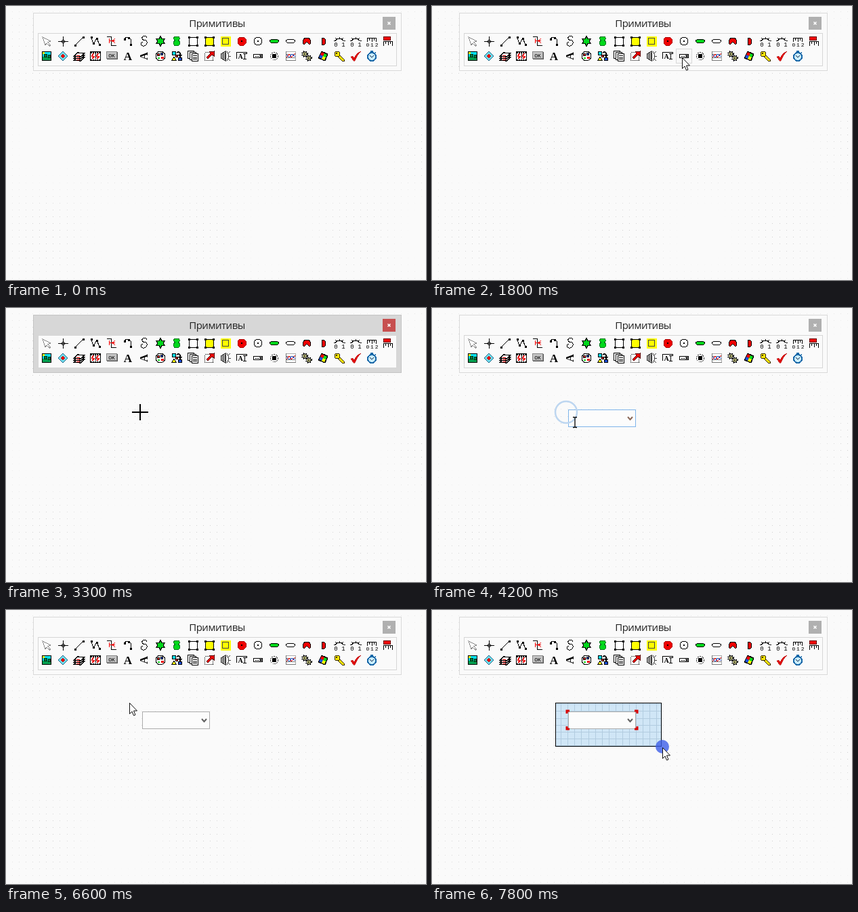
Animation of 620 by 405 pixels, one loop 8 s. Source, as an HTML page:

```html
<!DOCTYPE html>
<html lang="ru">
<head>
<meta charset="utf-8">
<title>Примитивы</title>
<style>
  html, body { margin: 0; width: 100%; height: 100%; overflow: hidden; background: #fafafa; }
  svg { display: block; width: 620px; height: 405px; }
  text { font-family: "Open Sans", "Noto Sans", sans-serif; }
  .mono { font-family: "Liberation Mono", monospace; }
  .serif { font-family: "Liberation Serif", serif; font-weight: bold; }
  #icons, #hover { shape-rendering: crispEdges; }
</style>
</head>
<body>
<svg id="stage" viewBox="0 0 620 405">
  <g id="dots"></g>
  <rect id="frame" x="40.5" y="10.5" width="543" height="85"/>
  <rect id="panel" x="47.5" y="40.5" width="529" height="48" fill="#fafafa" stroke="#d6d6d6"/>
  <text x="311.5" y="31" font-size="15" letter-spacing="-.45" text-anchor="middle" fill="#222">Примитивы</text>
  <rect id="close" x="556" y="16" width="19" height="19"/>
  <path d="M563.5 23.5l4 4m0-4l-4 4" stroke="#fff" stroke-width="1.5"/>
  <g id="hover"></g>
  <g id="icons"></g>
  <g id="scene"></g>
</svg>
<script>
const LOOP = 8000, STEP = 300;
const $ = id => document.getElementById(id);

const path = (d, fill = 'none', stroke = '#000', w = 1) =>
  `<path d="${d}" fill="${fill}" stroke="${stroke}" stroke-width="${w}"/>`;
const rect = (x, y, w, h, fill = 'none', stroke = 'none') =>
  `<rect x="${x}" y="${y}" width="${w}" height="${h}" fill="${fill}" stroke="${stroke}"/>`;
const oval = (x, y, rx, ry, fill = 'none', stroke = '#000', w = 1) =>
  `<ellipse cx="${x}" cy="${y}" rx="${rx}" ry="${ry}" fill="${fill}" stroke="${stroke}" stroke-width="${w}"/>`;
const disc = (x, y, r, fill = 'none', stroke = '#000', w = 1) => oval(x, y, r, r, fill, stroke, w);
const label = (x, y, s, size, cls, fill = '#000') =>
  `<text x="${x}" y="${y}" class="${cls}" font-size="${size}" text-anchor="middle" fill="${fill}">${s}</text>`;
const at = (x, y, s) => `<g transform="translate(${x} ${y})">${s}</g>`;
const knobs = (...xy) => xy.map(([x, y]) => rect(x - 1.5, y - 1.5, 3, 3, '#000')).join('');
const dashed = (s, dash) => s.replace('/>', ` stroke-dasharray="${dash}"/>`);

const RED = '#f00000', GREEN = '#00d81c', YELLOW = '#ffff00', CYAN = '#00e0f0', BLUE = '#1c50d8';
const corners = knobs([-5.5, -5.5], [6.5, -5.5], [-5.5, 6.5], [6.5, 6.5]);
const gauge = path('M-5.5-.5C-4-5 4-5 5.5-.5M-5.5-.5h-3M5.5-.5h3M-4-3l-2-2M4-3l2-2M.5-4v-2') +
  label(-5, 8, 0, 9, 'mono') + label(6, 8, 1, 9, 'mono');
const page = (x, y) => rect(x, y, 9, 11, '#fff', '#000');
const slab = y => path(`M-7.5 ${y + 2}L-2 ${y - 3}L7.5 ${y - 2}L2 ${y + 3}Z`, '#fff', '#000', 1.5) +
  path(`M-4 ${y + 1}L1 ${y + 1}`, 'none', RED);
const star = Array.from({length: 12}, (_, i) => {
  const a = i * Math.PI / 6, r = i % 2 ? 4 : 7.5;
  return `${(r * Math.sin(a)).toFixed(1)} ${(-r * Math.cos(a)).toFixed(1)}`;
}).join('L');
const gear = (x, y, r) => dashed(disc(x, y, r + 1, 'none', '#000', 2), '1.3 2') +
  disc(x, y, r, '#ffffa0', '#222') + disc(x, y, 1, '#fff');

const rows = [[
  path('M-6-6L6 0L1.5 1.5L6 6L4.5 7L0 3L-2 6Z', '#fff', '#888'),
  path('M-7 .5H8M.5-7V8') + disc(.5, .5, 2, 'none'),
  path('M-6 6L6-6') + knobs([-6, 6], [6, -6]),
  path('M-6-5L-3 4L2-4L6 5') + knobs([-6, -6], [-3, 3], [2, -4], [6, 5]),
  path('M-7-6.5H-.5V6.5H7') + path('M-3.5-4V3M-3.5-.5H5M5-4L1-.5L5 3', 'none', RED),
  path('M-5-4C1-9 7-3 4 5') + knobs([-5, -3], [1, -5], [4, 5]),
  path('M4-5C3-9-4-8-3-4C-3-1 0-2 3-1C6 3 2 8-2 7C-6 6-5 2-2 1'),
  path(`M${star}Z`, GREEN),
  path('M0-7C6-7 5-2 2-1C7 1 5 7 0 7C-5 7-7 1-2-1C-5-2-6-7 0-7Z', GREEN, '#087820'),
  rect(-5.5, -5.5, 12, 12, '#fff', '#000') + corners,
  rect(-5.5, -5.5, 12, 12, YELLOW, '#000') + corners,
  rect(-7, -7, 15, 15, YELLOW) + rect(-4.5, -4.5, 9, 9, YELLOW, '#444'),
  path('M-3-6H3L6-3V3L3 6H-3L-6 3V-3Z', RED, '#a00') + disc(0, 0, 1, '#000'),
  disc(0, 0, 6, '#fff') + disc(0, 0, 1, '#000', 'none'),
  oval(0, 0, 6.5, 2.8, GREEN),
  oval(0, 0, 6.5, 2.8, '#fff'),
  path('M0 1L-4 5C-8 1-5-5 0-5S8 1 4 5Z', RED),
  path('M-2-5C6-5 6 6-2 6Z', RED),
  gauge,
  gauge,
  path('M-6.5 1V-4.5H6.5V1M-3.5-4V-1M.5-4V1M3.5-4V-1') + label(.5, 8, '0 1 2', 8, 'mono').replace('>0', ' word-spacing="-3">0'),
  rect(-6.5, -6.5, 10, 5, RED, '#600') + path('M-6.5 7V.5H6.5V7M-3.5 1V4M.5 1V6M3.5 1V4')
], [
  rect(-6.5, -6.5, 13, 13, CYAN, '#000') + rect(-6, 1, 12, 5, '#00a050') +
    path('M-4 1V-3H0V1ZM2 2V-2H5V2Z', '#087840', '#031') + rect(-6, -6, 3, 3, YELLOW),
  path('M0-7L7 0L0 7L-7 0Z', '#70e0f0', '#268') + path('M0-3L3 0L0 3L-3 0Z', RED, '#a33'),
  slab(4) + slab(1) + slab(-2),
  rect(-7.5, -6.5, 15, 13, '#fff', '#000') +
    dashed(path('M-7-5.5H7M-7 5.5H7', 'none', '#000', 2), '2 1') +
    path('M.5-4V4') + path('M-3-4L-5 0L-2 1L-5 4M4-4L2 0L5 1L2 4', 'none', RED, 1.8),
  rect(-7.5, -6.5, 15, 10, '#c4c4c4', '#888') + path('M-7 4H8V-6', 'none', '#555') + label(0, 1.5, 'OK', 8, 'mono'),
  label(0, 6, 'A', 17, 'serif'),
  `<g transform="rotate(-90)">${label(0, 5, 'A', 16, 'serif')}</g>`,
  disc(0, 0, 7, '#fff') + disc(-3, -2, 2, RED) + disc(2, -3, 2, BLUE) + rect(1, 1, 4, 3, RED) + rect(-4, 2, 3, 2, GREEN),
  rect(-6.5, -6.5, 5, 5, CYAN, '#000') + path('M0-5C4-8 6-4 5 0M3-2L5 1L7-2', 'none', '#000', 1.5) +
    path('M-4 1L-1 6H-7Z', YELLOW) + rect(2.5, 2.5, 5, 4, BLUE, '#000') + disc(0, 0, 2, RED),
  page(-7.5, -7.5) + page(-4.5, -5.5) + page(-1.5, -3.5) + path('M0-.5H6M0 2.5H6M0 4.5H6'),
  dashed(rect(-6.5, -5.5, 12, 12, '#fff', '#000'), '1 1') + path('M7-7V0L4-2L-2 4L-4 2L2-4L0-6Z', RED, '#500'),
  path('M-7-3L0-7V7L-7 3Z', '#aaa', '#333') + path('M-4-4V4M-1-5V5M2-7L4-3V3L2 7M4-4L7-7M5 0H8M4 4L7 7', 'none', '#444'),
  path('M-7.5 4V-5.5H7.5V-3') + label(-2, 4, 'A', 10, 'serif') + path('M2-3.5H7M4.5-3V4M2 4.5H7'),
  rect(-6.5, -2.5, 13, 5, '#fff', '#000') + path('M-4 .5H-2M-1 .5H1') + rect(2, -2, 4, 4, '#888') + path('M3-1L4 1L5-1'),
  dashed(disc(0, 0, 5.5, '#fff', '#333'), '2 1') + disc(0, 0, 3, '#000'),
  rect(-6.5, -6.5, 14, 13, '#fff', '#aaa') + path('M-6.5-7V6.5H8M-6-2.5H7M-6 2.5H7', 'none', '#777') +
    path('M-6 2L-2-3L1 2L7-4', 'none', RED) + path('M-6-2L-2 2L2-3L7 1', 'none', BLUE),
  gear(-3, -3, 3) + gear(3, 3, 3),
  path('M-2-7L7-3L3 7L-7 3Z', '#111') + path('M-2-6L2-4L0 0L-4-2Z', RED, 'none') +
    path('M2-4L6-2L4 2L0 0Z', GREEN, 'none') + path('M-4-2L0 0L-2 4L-6 2Z', BLUE, 'none') + path('M0 0L4 2L2 6L-2 4Z', YELLOW, 'none'),
  path('M0-2L7 5V7H4L-2 1Z', '#ffe800', '#332800') + disc(-3, -3, 4, '#ffe800', '#332800') + disc(-4, -4, 1, '#fff', '#332800'),
  path('M-7 1L-4 0L-2 3C0-2 4-6 8-7C3-2 1 2-1 7H-3Z', '#e01010', '#b00000', .5),
  disc(0, 1, 6, '#c8ecff', '#1868a8', 2) + path('M-2-7H2M0-7V-5M5-5L6-4', 'none', '#1868a8', 2) + path('M-3-1L0 2L3-1', 'none', '#124')
]];

$('icons').innerHTML = rows.map((row, r) =>
  row.map((s, i) => at(60 + 24 * i, 52 + 22 * r, s)).join('')).join('');

// Grid dots fade in and out in a slow checkerboard
const gridX = i => Math.round(9 + 10.07 * i), gridY = j => Math.round(8 + 10.1 * j);
const wave = (v, mid, period) => Math.cos(2 * Math.PI * (v - mid) / period);
let dots = '';
for (let i = 0; i <= 60; i++) for (let j = 0; j < 40; j++) {
  const x = gridX(i), y = gridY(j);
  const a = Math.max(0, .07 + .11 * wave(x, 172, 228) * wave(y, 206, 260));
  dots += `<rect x="${x}" y="${y}" width="1" height="1" opacity="${a.toFixed(3)}"/>`;
}
$('dots').innerHTML = dots;

const route = [[300, 420, 260], [900, 372, 80], [1800, 369, 76], [2400, 369, 76], [3300, 198, 154],
  [3900, 198, 154], [4200, 211, 169], [4800, 211, 169], [6000, 182, 137], [6900, 182, 137], [7800, 340, 203]];

function pointer(t) {
  const n = Math.max(1, route.findIndex(k => k[0] >= t));
  const [t0, x0, y0] = route[n - 1], [t1, x1, y1] = route[n];
  const u = Math.max(0, (t - t0) / (t1 - t0)), e = u * u * (3 - 2 * u);
  return [Math.round(x0 + (x1 - x0) * e), Math.round(y0 + (y1 - y0) * e)];
}

const arrow = path('M.5.5V16.5L4 13L6.5 19L9 18L6.5 12H11.5Z', '#fff', '#111');
const plus = path('M-12 0H12M0-12V12', 'none', '#000', 2);
const beam = path('M-3-7.5H-1L0-7L1-7.5H3M0-7V7M-3 7.5H-1L0 7L1 7.5H3', 'none', '#000', 1.3);

const press = (x, y) => `<g opacity=".8">${disc(x, y, 10, '#3c5ee8', 'none')}</g>`;
const ripple = (x, y, age) => age > 0 && age <= 600
  ? disc(x, y, 4 + age / 50, 'none', '#bdd6f0', 2.5) : '';

function combo(focused) {
  return rect(201.5, 150.5, 99, 25, '#fcfcfc', focused ? '#7eb4ea' : '#acacac') +
    path('M289 161L292.5 165L296 161', 'none', focused ? '#8a6858' : '#606060', 2);
}

function selection(x, y) {
  const w = x - 183, h = y - 138;
  if (w < 1 || h < 1) return '';
  let lines = '';
  for (let i = 0; i < 61; i++) if (gridX(i) > 183 && gridX(i) < x) lines += `M${gridX(i) + .5} 138V${y - 1}`;
  for (let j = 0; j < 40; j++) if (gridY(j) > 138 && gridY(j) < y) lines += `M183 ${gridY(j) + .5}H${x - 1}`;
  return rect(182.5, 137.5, w, h, '#d0e6f6') + path(lines, 'none', '#b2cce0') + rect(182.5, 137.5, w - 1, h - 1, 'none', '#000');
}

const handles = path('M199 153V149H203M299 149H303V153M199 172V176H203M299 176H303V172', 'none', '#d80000', 3);

function draw(t) {
  const [x, y] = pointer(t), active = t >= 2100 && t < 3900;
  $('frame').setAttribute('fill', active ? '#d7d7d7' : '#fafafa');
  $('frame').setAttribute('stroke', active ? '#c4c4c4' : '#d9d9d9');
  $('close').setAttribute('fill', active ? '#c75050' : '#b0b0b0');

  const over = t >= 300 && x > 360 && x < 384 && y < 86 && y > 64;
  $('hover').innerHTML = over
    ? rect(360.5, 63.5, 23, 21, active ? '#bdf0f4' : '#f8f8f8', active ? '#70c8d8' : '#d8d8d8') : '';

  const dragging = t >= 6900;
  let s = '';
  if (dragging) s += selection(x, y);
  if (t >= 3900) s += combo(t < 6300);
  if (dragging && x > 301 && y > 176) s += handles;
  s += ripple(370, 75, t - 2100) + ripple(198, 154, t - 3600);
  if (t === 2100) s += press(370, 75);
  if (t === 3600) s += press(198, 154);
  if (dragging) s += press(x, y - 1);
  if (t >= 300) {
    const inBox = t >= 3900 && !dragging && x > 201 && y > 150;
    s += at(x, y, active && y > 96 ? plus : inBox ? beam : arrow);
  }
  $('scene').innerHTML = s;
}

let shown = -1;
function tick(now) {
  const t = Math.floor(now % LOOP / STEP) * STEP;
  if (t !== shown) draw(shown = t);
  requestAnimationFrame(tick);
}
tick(performance.now());
</script>
</body>
</html>
```
